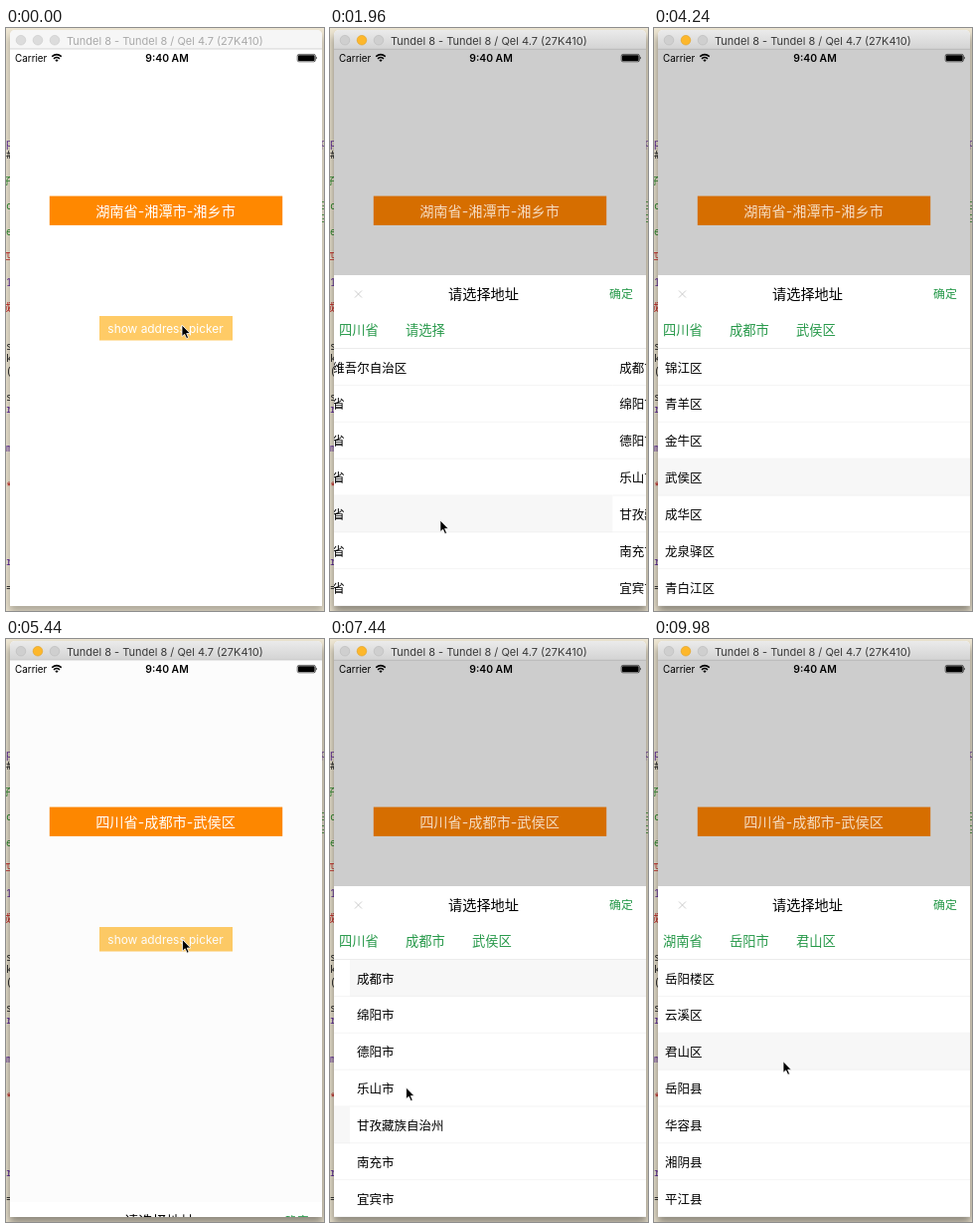
Animation, 320 px wide and 585 px high, one loop 10 s. Source, as an HTML page:

```html
<!DOCTYPE html>
<html lang="zh-CN">
<head>
<meta charset="utf-8">
<title>Address picker</title>
<style>
html, body { margin: 0; width: 100%; height: 100%; overflow: hidden; background: #efe7d3; }
svg { display: block; width: 320px; height: 585px; }
text { font-family: Inter, "Noto Sans CJK SC", "Noto Sans CJK", sans-serif; white-space: pre; }
#code text { font-family: "Noto Sans Mono", "Noto Sans CJK SC", monospace; }
</style>
</head>
<body>
<svg viewBox="0 0 320 585" xmlns="http://www.w3.org/2000/svg">
  <defs>
    <linearGradient id="bar" x1="0" y1="0" x2="0" y2="1">
      <stop offset="0" stop-color="#ebebeb"/><stop offset="1" stop-color="#d3d3d3"/>
    </linearGradient>
    <filter id="blur" x="-10%" y="-10%" width="120%" height="120%"><feGaussianBlur stdDeviation="4"/></filter>
    <clipPath id="screen"><rect x="4" y="21" width="314" height="559"/></clipPath>
  </defs>
  <rect width="320" height="585" fill="#efe7d3"/>
  <g id="code"></g>
  <rect id="shadow" x="3" y="8" width="316" height="578" filter="url(#blur)"/>
  <path d="M4 580V7a5 5 0 0 1 5-5H313a5 5 0 0 1 5 5V580Z" fill="#fff"/>
  <path id="titlebar" d="M4 21V7a5 5 0 0 1 5-5H313a5 5 0 0 1 5 5V21Z"/>
  <path d="M4 21H318" stroke="#c4c4c4" stroke-width=".7"/>
  <g id="lights" stroke-width=".6"></g>
  <g id="title"></g>
  <g clip-path="url(#screen)">
    <g id="home"></g>
    <rect id="dim" x="4" y="21" width="314" height="559"/>
    <g id="address"></g>
    <g id="status">
      <g fill="none" stroke="#000" stroke-width="1.5">
        <path d="M46.2 28.6Q51 24.6 55.8 28.6"/><path d="M48 30.8Q51 28.4 54 30.8"/>
      </g>
      <path d="M49.4 32.2Q51 30.9 52.6 32.2L51 34Z"/>
      <rect x="293.2" y="26.4" width="18.2" height="7.4" rx="1.6" fill="none" stroke="#000" stroke-width=".6"/>
      <rect x="294" y="27.2" width="16.6" height="5.8" rx=".8"/>
      <path d="M312.2 28.6q1.6 1.5 0 3Z"/>
    </g>
    <g id="sheet">
      <rect x="4" y="248" width="314" height="334" fill="#fff"/>
      <path d="M25 263.5l7 7m0-7l-7 7" stroke="#c4c4c4" stroke-width=".9"/>
      <path d="M4 321.5H318" stroke="#e8e8e8" stroke-width=".8"/>
      <g id="pages"></g>
    </g>
  </g>
  <path id="cursor" d="M0 0V11.6L2.7 9.2L4.7 13.6L6.6 12.7L4.7 8.5H8.3Z" stroke="#fff" stroke-width=".8"/>
</svg>
<script>
const LOOP = 10000, SLIDE = 300, PAGE_W = 314, ROW_H = 36.84, TOP = 322, GREEN = '#27994a';
const $ = id => document.getElementById(id);

function add(parent, tag, attrs) {
  const el = document.createElementNS('http://www.w3.org/2000/svg', tag);
  set(el, attrs);
  parent.appendChild(el);
  return el;
}
function set(el, attrs) {
  for (const k in attrs) el.setAttribute(k, attrs[k]);
}
// Text whose glyphs are centred vertically on y
function label(parent, str, x, y, size, fill = '#000', anchor = 'start', weight = 400) {
  const el = add(parent, 'text', { x, y: y + size * .37, 'font-size': size, fill, 'text-anchor': anchor, 'font-weight': weight });
  el.textContent = str;
  return el;
}
const mix = (a, b, p) => a + (b - a) * p;
const ease = p => (p = Math.min(1, Math.max(0, p)), p * p * (3 - 2 * p));

const provinces = '新疆维吾尔自治区 河南省 山东省 湖南省 四川省 广东省 安徽省'.split(' ');
const children = {
  湖南省: '长沙市 岳阳市 湘潭市 株洲市 衡阳市 常德市 郴州市',
  四川省: '成都市 绵阳市 德阳市 乐山市 甘孜藏族自治州 南充市 宜宾市',
  山东省: '滨州市 威海市 济宁市 泰安市 淄博市 东营市 枣庄市',
  湘潭市: '雨湖区 岳塘区 湘潭县 湘乡市 韶山市',
  成都市: '锦江区 青羊区 金牛区 武侯区 成华区 龙泉驿区 青白江区',
  岳阳市: '岳阳楼区 云溪区 君山区 岳阳县 华容县 湘阴县 平江县'
};
const listFor = (sel, page) => page ? (children[sel[page - 1]] || '').split(' ') : provinces;

// What the user does and when; everything else follows from it
const script = `60 open, 780 tab 1, 1400 tab 0, 1900 row 4, 2575 row 0, 3350 row 3,
  4240 leave, 4600 confirm, 5400 open, 5850 swipe 1, 6434 swipe 1, 6950 swipe -1,
  7400 swipe -1, 8000 row 2, 8660 tab 0, 9050 row 3, 9400 row 1, 9700 row 2`;

const spots = {
  open: () => [177, 298],
  confirm: () => [291, 266],
  leave: () => [330, 340],
  tab: n => [34 + 69 * n, 303],
  row: n => [150 - 10 * n, TOP + ROW_H * n + 28],
  swipe: dir => [135 + 65 * dir, 450]
};
const actions = {
  open: s => { s.open = 1; s.page = s.fromPage = 0; },
  confirm: s => { s.open = 0; s.address = s.sel.join('-'); },
  leave: () => {},
  tab: (s, n) => { s.page = n; },
  row: (s, n) => {
    s.sel = [...s.sel.slice(0, s.page), listFor(s.sel, s.page)[n]];
    s.page = Math.min(2, s.page + 1);
  },
  swipe: (s, dir) => { s.page += dir; s.end = spots.swipe(-dir); }
};

const home = ['湖南省', '湘潭市', '湘乡市'];
const states = [{ t: 0, sel: home, address: home.join('-'), page: 0, fromPage: 0, open: 0, fromOpen: 0, spot: spots.open(), end: spots.open() }];
for (const line of script.split(',')) {
  const [t, what, n] = line.trim().split(' ');
  const last = states[states.length - 1], spot = spots[what](+n);
  const next = { ...last, t: +t, fromPage: last.page, fromOpen: last.open, spot, end: spot };
  actions[what](next, +n);
  states.push(next);
}

function pointerAt(t, cur, next) {
  const drag = cur.end !== cur.spot ? SLIDE : 0;
  if (t < cur.t + drag || !next) {
    const p = drag && ease((t - cur.t) / drag);
    return cur.spot.map((v, i) => mix(v, cur.end[i], p));
  }
  const p = ease((t - cur.t - drag) / (next.t - cur.t - drag));
  return cur.end.map((v, i) => mix(v, next.spot[i], p));
}

// Editor text peeking out beside the window, one glyph per line
const inks = { 'p1mr': '#5c2699', '子ce三': '#2a8a2a', '四成*': '#c41a16' };
const ink = ch => inks[Object.keys(inks).find(k => k.includes(ch))] || '#222';
[...'p# 子 c e 四 1 成  sk( sr  m  *     r ='].forEach((ch, i) => label($('code'), ch, 6, 115 + 12.75 * i, 10, ink(ch), 'end'));
[...'p    三三'].forEach((ch, i) => label($('code'), ch, 316.5, 115 + 12.75 * i, 10, ink(ch)));

const lights = [15, 32, 49].map(cx => add($('lights'), 'circle', { cx, cy: 12.2, r: 4.8 }));
const title = label($('title'), 'Tundel 8 - Tundel 8 / Qel 4.7 (27K410)', 61, 12.6, 11);

const box = add($('address'), 'rect', { x: 43.8, y: 168.6, width: 234.4, height: 29.3 });
const address = label($('address'), '', 160.5, 184, 14.2, '#fff', 'middle');
add($('home'), 'rect', { x: 94, y: 289, width: 134, height: 24.5, fill: '#ffcb66' });
label($('home'), 'show address picker', 160.5, 301.3, 11.9, '#fff', 'middle');

label($('status'), 'Carrier', 9, 30, 9.9);
label($('status'), '9:40 AM', 162, 30, 10.4, '#000', 'middle', 600);

label($('sheet'), '请选择地址', 154.5, 267, 14.2, '#000', 'middle');
label($('sheet'), '确定', 281, 267, 11.9, GREEN);
const tabs = [0, 1, 2].map(n => label($('sheet'), '', 9 + 67 * n, 303.5, 13.3, GREEN));

const pages = [0, 1, 2].map(n => {
  const g = add($('pages'), 'g', { transform: `translate(${n * PAGE_W} 0)` });
  const mark = add(g, 'rect', { x: 4, width: PAGE_W, height: ROW_H, fill: '#f7f7f7' });
  const rows = Array.from({ length: 7 }, (_, i) => {
    const y = TOP + i * ROW_H;
    add(g, 'path', { d: `M4 ${y + ROW_H - .4}H318`, stroke: '#efefef', 'stroke-width': .7 });
    return label(g, '', 11, y + 19, 12.5);
  });
  return { mark, rows };
});

let shown = null;
function showSelection(sel) {
  if (sel === shown) return;
  shown = sel;
  tabs.forEach((tab, i) => tab.textContent = sel[i] || (i === sel.length ? '请选择' : ''));
  pages.forEach(({ mark, rows }, n) => {
    const names = listFor(sel, n), chosen = names.indexOf(sel[n]);
    rows.forEach((row, i) => row.textContent = names[i] || '');
    set(mark, { y: TOP + chosen * ROW_H, visibility: chosen < 0 ? 'hidden' : 'inherit' });
  });
}

function showWindow(active) {
  set($('titlebar'), { fill: active ? 'url(#bar)' : '#f6f6f6' });
  set($('shadow'), { 'fill-opacity': active ? .42 : .28 });
  set(title, { fill: active ? '#383838' : '#a9a9a9' });
  lights.forEach((light, i) => set(light, active && i === 1
    ? { fill: '#fdb72b', stroke: '#dfa023' }
    : { fill: active ? '#cfcfcf' : '#dcdcdc', stroke: active ? '#b9b9b9' : '#c8c8c8' }));
}

function draw(t) {
  const i = states.filter(s => t >= s.t).length - 1;
  const cur = states[i], p = ease((t - cur.t) / SLIDE);
  const open = mix(cur.fromOpen, cur.open, p);
  const page = mix(cur.fromPage, cur.page, p);

  showWindow(i > 0);
  showSelection(cur.sel);
  address.textContent = cur.address;
  set(box, { fill: `rgb(${mix(255, 214, open)},${mix(136, 110, open)},0)` });
  set(address, { 'fill-opacity': mix(1, .75, open) });
  set($('dim'), { 'fill-opacity': .196 * open });
  set($('sheet'), { transform: `translate(0 ${(1 - open) * 334})` });
  set($('pages'), { transform: `translate(${-page * PAGE_W} 0)` });
  set($('cursor'), { transform: `translate(${pointerAt(t, cur, states[i + 1])})` });
}

const start = performance.now();
function tick(now) {
  draw(Math.max(0, now - start) % LOOP);
  requestAnimationFrame(tick);
}
draw(0);
requestAnimationFrame(tick);
</script>
</body>
</html>
```
